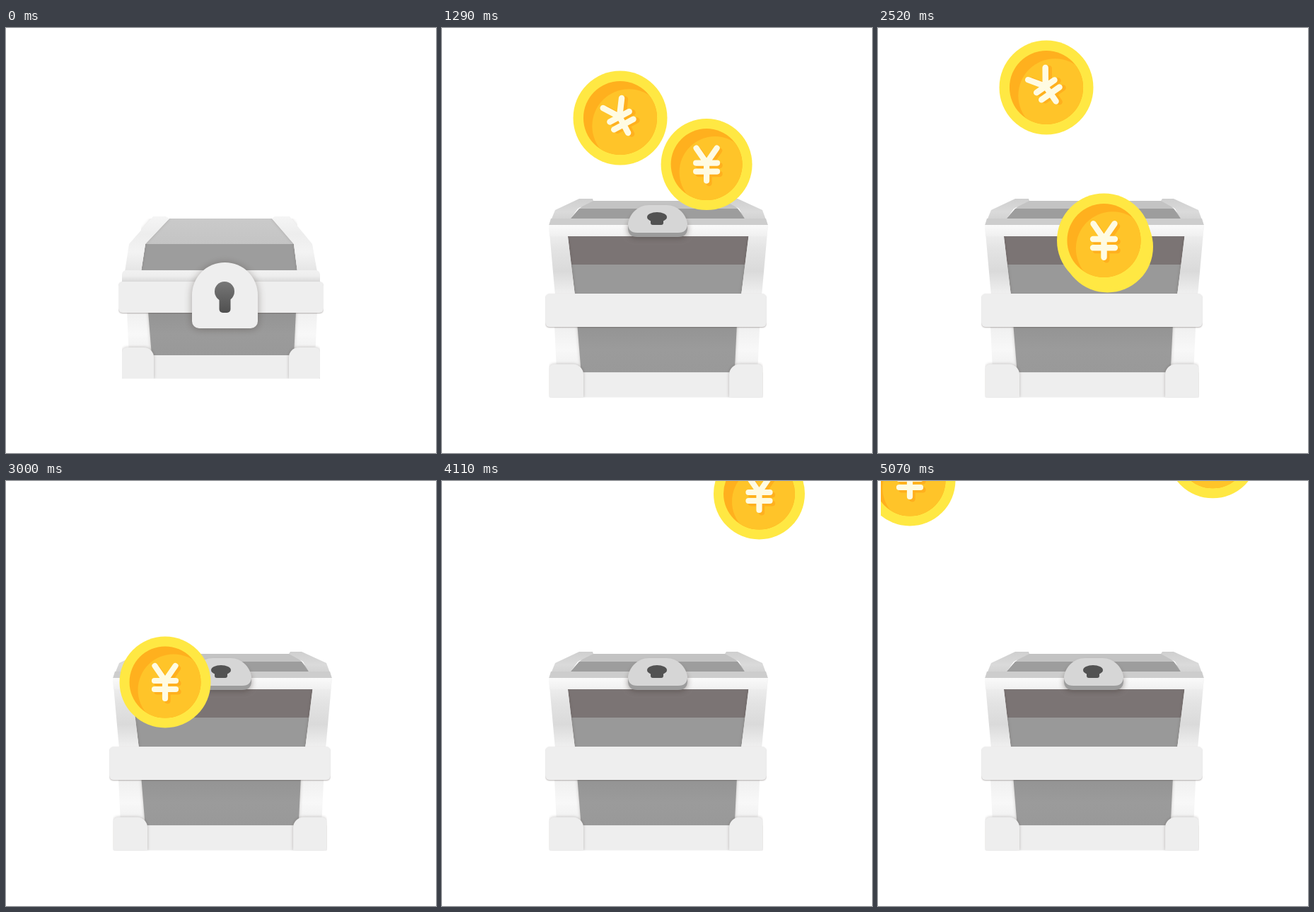
An HTML page with a canvas that plays this animation: 608x600 px, repeating every 5100 ms.

```html
<!DOCTYPE html>
<html lang="en">
<head>
<meta charset="utf-8">
<title>Treasure chest</title>
<style>
html, body { margin: 0; width: 100%; height: 100%; overflow: hidden; background: #fff; }
canvas { display: block; }
</style>
</head>
<body>
<canvas id="stage" width="608" height="600"></canvas>
<script>
const ctx = document.getElementById('stage').getContext('2d');
const STEP = 30, FRAMES = 170, OPEN_AT = 19;

// Every lane throws coins along a straight line; each first throw repeats with the lane's period.
const lanes = [
  { x: 324.5, y: 309, dx: 24.8, dy: -58.2, r: 64.5, spin: 0, life: 7, period: 30.5, first: [23, 41] },
  { x: 225, y: 284, dx: -36, dy: -57, r: 64.5, spin: 0, life: 7, period: 44.5, first: [23, 30.5, 56] },
  { x: 308, y: 299, dx: -14, dy: -43, r: 66.5, spin: -7, life: 9, period: 40, first: [39] },
  { x: 319.5, y: 300, dx: 5.6, dy: -41.5, r: 66.5, spin: 0, life: 8, period: 30.5, first: [23.5, 29.5] }
];

function grad(y0, y1, ...colors) {
  const g = ctx.createLinearGradient(0, y0, 0, y1);
  colors.forEach((c, i) => g.addColorStop(i / (colors.length - 1), c));
  return g;
}

function poly(fill, ...pts) {
  ctx.beginPath();
  for (let i = 0; i < pts.length; i += 2) ctx.lineTo(pts[i], pts[i + 1]);
  ctx.closePath();
  ctx.fillStyle = fill;
  ctx.fill();
}

function box(fill, x, y, w, h, radii = 0) {
  ctx.beginPath();
  ctx.roundRect(x, y, w, h, radii);
  ctx.fillStyle = fill;
  ctx.fill();
}

function disc(fill, x, y, r) {
  ctx.beginPath();
  ctx.arc(x, y, r, 0, 7);
  ctx.fillStyle = fill;
  ctx.fill();
}

// Draws with a soft shadow that stays inside the given rectangle.
function shaded(blur, dy, alpha, area, draw) {
  ctx.save();
  ctx.beginPath();
  ctx.rect(...area);
  ctx.clip();
  ctx.shadowColor = `rgba(60,50,45,${alpha})`;
  ctx.shadowBlur = blur;
  ctx.shadowOffsetY = dy;
  draw();
  ctx.restore();
}

function body() {
  const post = grad(402, 462, '#f0f0f0', '#f8f8f8', '#eee');
  poly(post, 171, 400, 204, 400, 208, 464, 174, 464);
  poly(post, 440, 400, 407, 400, 403, 464, 437, 464);
  shaded(4, 0, 0.25, [190, 402, 230, 64], () =>
    poly(grad(402, 462, '#949494', '#9b9b9b', '#999'), 201, 400, 410, 400, 407, 462, 206, 462));
  box('#eee', 165, 462, 279, 33);
  shaded(4, 0, 0.3, [164, 447, 280, 48], () => {
    box('#eee', 164, 451, 45, 44, [7, 14, 0, 2]);
    box('#eee', 400, 451, 44, 44, [14, 7, 2, 0]);
  });
  shaded(2, 1, 0.35, [159, 356, 290, 48], () => box('#eee', 159, 358, 290, 44, 6));
}

function closedChest() {
  poly(grad(269, 305, '#cacaca', '#c4c4c4'), 229, 269, 378, 269, 408, 305, 196, 305);
  poly('#9d9d9d', 197, 305, 407, 305, 412, 344, 191, 344);
  const rails = () => {
    const tone = grad(266, 342, '#f5f5f5', '#ededed', '#f3f3f3', '#e6e6e6');
    poly(tone, 208, 266, 226, 266, 231, 269, 197, 305, 191, 344, 168, 344, 174, 305);
    poly(tone, 401, 266, 380, 266, 376, 269, 407, 305, 412, 344, 440, 344, 433, 305);
  };
  shaded(4, 0, 0.2, [191, 269, 221, 75], rails);
  rails();
  box(grad(342, 358, '#f1f1f1', '#eee', '#dadada'), 164, 342, 280, 18, [6, 6, 0, 0]);
  body();
  shaded(12, 1, 0.4, [240, 310, 140, 140], () => box('#eee', 263, 331, 93, 93, [46, 46, 10, 10]));
  const hole = grad(358, 402, '#777', '#636363', '#505050');
  box(hole, 301.5, 376, 16, 26, 5);
  disc(hole, 309, 372, 14);
}

function lidLock(fill, dy) {
  ctx.beginPath();
  ctx.moveTo(263, 276 + dy);
  ctx.bezierCurveTo(265, 262 + dy, 278, 250 + dy, 292, 250 + dy);
  ctx.lineTo(318, 250 + dy);
  ctx.bezierCurveTo(332, 250 + dy, 345, 262 + dy, 347, 276 + dy);
  ctx.quadraticCurveTo(347, 289 + dy, 334, 289 + dy);
  ctx.lineTo(276, 289 + dy);
  ctx.quadraticCurveTo(263, 289 + dy, 263, 276 + dy);
  ctx.fillStyle = fill;
  ctx.fill();
}

function openChest() {
  poly('#c3c3c3', 205, 244, 408, 244, 440, 279, 172, 279);
  poly('#9d9d9d', 194, 255, 418, 255, 428, 269, 182, 269);
  const rail = grad(241, 278, '#cfcfcf', '#dadada', '#cdcdcd');
  poly(rail, 194, 241, 213, 241, 214, 244, 192, 255, 182, 269, 182, 279, 151, 279, 160, 257);
  poly(rail, 418, 241, 402, 241, 400, 244, 420, 255, 428, 269, 428, 279, 461, 279, 453, 257);
  poly('#cdcdcd', 154, 269, 458, 269, 461, 279, 151, 279);
  poly('#7b7474', 176, 292, 436, 292, 429, 335, 182, 335);
  poly('#999', 182, 334, 429, 334, 423, 378, 188, 378);
  const posts = () => {
    const tone = grad(278, 376, '#f5f5f5', '#e4e4e4', '#dadada', '#f0f0f0');
    poly(tone, 151, 278, 176, 278, 188, 378, 160, 378);
    poly(tone, 461, 278, 435.5, 278, 423, 378, 452, 378);
  };
  shaded(5, 0, 0.25, [176, 290, 260, 88], posts);
  posts();
  poly(grad(278, 294, '#fafafa', '#f0f0f0'), 151, 278, 461, 278, 459, 294, 152, 294);
  shaded(8, 1, 0.5, [250, 244, 110, 64], () => lidLock('#9c9c9c', 6));
  lidLock('#d6d6d6', 0);
  ctx.beginPath();
  ctx.ellipse(304, 267, 14, 7, 0, 0, 7);
  ctx.fillStyle = '#525252';
  ctx.fill();
  box('#525252', 295, 269, 18, 9, 3);
  ctx.save();
  ctx.translate(302.5, 375);
  ctx.scale(1.079, 1.069);
  ctx.translate(-304, -358);
  body();
  ctx.restore();
}

function yen(color, shift) {
  const line = (x0, y0, x1, y1) => {
    ctx.moveTo(x0 + shift, y0 + shift);
    ctx.lineTo(x1 + shift, y1 + shift);
  };
  ctx.beginPath();
  for (const side of [-1, 1]) line(side * 14.5, -23, 0, -2);
  for (const y of [-2, 10]) line(-15, y, 15, y);
  line(0, -2, 0, 23);
  ctx.strokeStyle = color;
  ctx.lineWidth = 8.2;
  ctx.lineCap = 'round';
  ctx.stroke();
}

function coin(x, y, r, turn) {
  ctx.save();
  ctx.translate(x, y);
  ctx.scale(r / 64.5, r / 64.5);
  disc('#ffe843', 0, 0, 64.5);
  disc('#ffb01e', 0, 0, 50.5);
  ctx.save();
  ctx.clip();
  disc('#ffc429', 12, 11, 50.5);
  ctx.restore();
  ctx.rotate(turn * Math.PI / 180);
  yen('#ffb01e', 3.5);
  yen('#fffbe2', 0);
  ctx.restore();
}

function scaled(s, draw) {
  ctx.save();
  ctx.translate(304, 381);
  ctx.scale(s, s);
  ctx.translate(-304, -381);
  draw();
  ctx.restore();
}

function render(now) {
  const n = Math.floor(now / STEP) % FRAMES;
  ctx.fillStyle = '#fff';
  ctx.fillRect(0, 0, 608, 600);
  if (n < OPEN_AT) scaled(1 - 0.05 * Math.sin(Math.PI * n / OPEN_AT), closedChest);
  else scaled(Math.min(1, 0.94 + 0.02 * (n - OPEN_AT)), openChest);

  ctx.save();
  ctx.beginPath();
  ctx.rect(4, 0, 600, 600);
  ctx.clip();
  for (const c of lanes) {
    for (const first of c.first) {
      for (let t = first; t < n + 1; t += c.period) {
        const k = n - Math.floor(t);
        if (k < c.life) coin(c.x + c.dx * k, c.y + c.dy * k, c.r, c.spin * k);
      }
    }
  }
  ctx.restore();
}

const begin = performance.now();
function tick() {
  render(performance.now() - begin);
  requestAnimationFrame(tick);
}
tick();
</script>
</body>
</html>
```
